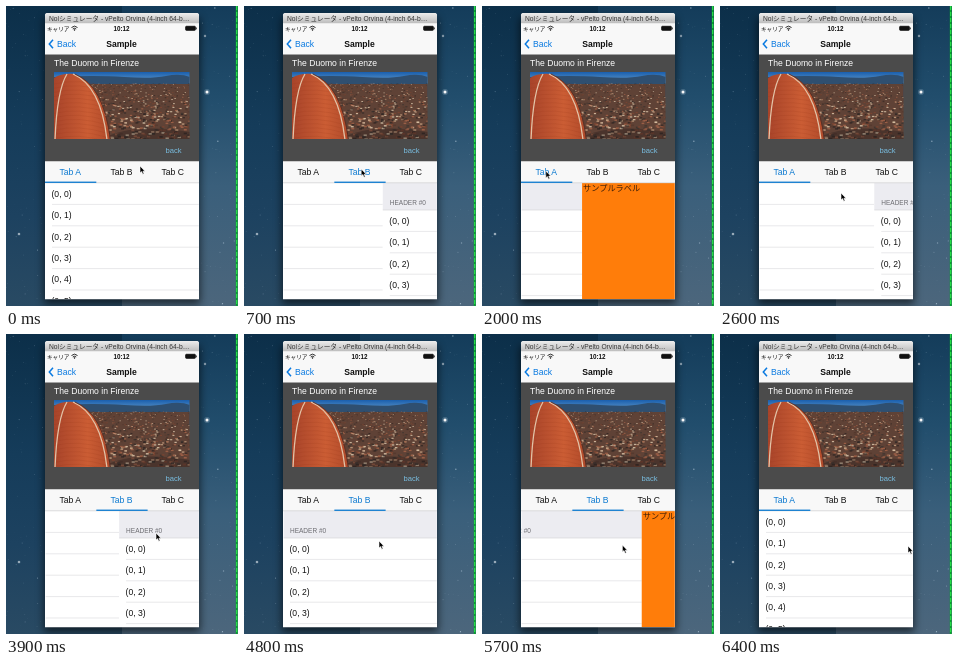
These frames come from a looping animation (232x300 px, 6500 ms). An HTML page:

```html
<!DOCTYPE html>
<html lang="ja">
<head>
<meta charset="utf-8">
<title>Tab pager</title>
<style>
html, body { margin: 0; width: 100%; height: 100%; overflow: hidden; background: #10283f; }
svg { display: block; width: 100%; height: 100%; }
text { font-family: "Liberation Sans", "Noto Sans CJK JP", "Noto Sans CJK", sans-serif; font-size: 8.6px; fill: #111; }
.mid { text-anchor: middle; }
.bold { font-weight: bold; }
</style>
</head>
<body>
<svg id="stage" viewBox="0 0 232 300" xmlns="http://www.w3.org/2000/svg">
  <defs>
    <linearGradient id="west" x1="0" y1="0" x2="0" y2="1">
      <stop offset="0" stop-color="#0c2f49"/>
      <stop offset=".4" stop-color="#153c5a"/>
      <stop offset=".7" stop-color="#1d4260"/>
      <stop offset="1" stop-color="#294a63"/>
    </linearGradient>
    <linearGradient id="east" x1="0" y1="0" x2="0" y2="1">
      <stop offset="0" stop-color="#143c5a"/>
      <stop offset=".3" stop-color="#214d6c"/>
      <stop offset=".6" stop-color="#3a5f7b"/>
      <stop offset="1" stop-color="#4c667c"/>
    </linearGradient>
    <linearGradient id="bar" x1="0" y1="0" x2="0" y2="1">
      <stop offset="0" stop-color="#ededed"/>
      <stop offset="1" stop-color="#bcbcbc"/>
    </linearGradient>
    <linearGradient id="air" x1="0" y1="0" x2="0" y2="1">
      <stop offset="0" stop-color="#1a5fae"/>
      <stop offset="1" stop-color="#6ea3cf"/>
    </linearGradient>
    <linearGradient id="tiles" x1="0" y1="0" x2="1" y2="0">
      <stop offset="0" stop-color="#a8442a"/>
      <stop offset=".6" stop-color="#cb5d34"/>
      <stop offset="1" stop-color="#b04a2a"/>
    </linearGradient>
    <filter id="soft" x="-20%" y="-10%" width="140%" height="120%"><feGaussianBlur stdDeviation="4"/></filter>
    <clipPath id="screen"><rect x="39.600" y="177" width="153.200" height="116"/></clipPath>
    <clipPath id="frame"><rect x="48" y="66" width="135.500" height="67"/></clipPath>
  </defs>

  <rect width="116" height="300" fill="url(#west)"/>
  <rect x="116" width="116" height="300" fill="url(#east)"/>
  <g id="stars" fill="#c5d9e8"></g>
  <path d="M230.700 0V300" stroke="#06a52c" stroke-width="1.800"/>
  <path d="M230.700 0V300" stroke="#2ce04c" stroke-width="1.200" stroke-dasharray="4 2"/>

  <rect x="38" y="12" width="156" height="286" fill="#000" opacity=".6" filter="url(#soft)"/>
  <path d="M39 293.300V9.500Q39 7 41.500 7H190.500Q193 7 193 9.500V293.300Z" fill="#fff"/>
  <path d="M39 17.500V9.500Q39 7 41.500 7H190.500Q193 7 193 9.500V17.500Z" fill="url(#bar)"/>
  <text x="43" y="14.900" style="font-size:6.700px;fill:#333">Nolシミュレータ - vPelto Orvina (4-inch 64-b…</text>

  <rect x="39" y="17.500" width="154" height="31" fill="#f8f8f8"/>
  <text x="41" y="24.500" style="font-size:5.600px">キャリア</text>
  <g fill="none" stroke="#111" stroke-width=".9">
    <path d="M65.500 21.500Q68.500 18.800 71.500 21.500M66.800 23Q68.500 21.500 70.200 23"/>
    <rect x="179.700" y="20.300" width="9.600" height="4" rx=".6" fill="#111"/>
    <path d="M190.300 21.500V23.300"/>
  </g>
  <circle cx="68.500" cy="24" r=".7"/>
  <text class="mid bold" x="115.500" y="24.700" style="font-size:6.300px">10:12</text>
  <path d="M47 33.800L43.300 38L47 42.200" fill="none" stroke="#0879e0" stroke-width="1.500"/>
  <text x="51" y="41" style="fill:#0879e0">Back</text>
  <text class="mid bold" x="115.500" y="41">Sample</text>

  <rect x="39" y="48.500" width="154" height="107" fill="#4b4b4b"/>
  <text x="48" y="60.300" style="fill:#fff">The Duomo in Firenze</text>
  <g id="photo" clip-path="url(#frame)"></g>
  <text x="159.500" y="147.300" style="font-size:7.600px;fill:#79bde0">back</text>

  <g id="pages" clip-path="url(#screen)"></g>

  <rect x="39" y="155.500" width="154" height="21.500" fill="#f8f8f8"/>
  <path d="M39 176.800H193" stroke="#c4c4c8" stroke-width=".6"/>
  <g id="tabs"></g>
  <rect id="line" y="175.600" width="51.300" height="1.300" fill="#0b79d0"/>
  <path id="cursor" d="M0 0V7L1.600 5.600L2.800 8.300L4 7.700L2.900 5.200H5Z" fill="#000" stroke="#fff" stroke-width=".6"/>
</svg>
<script>
const LOOP = 6500, STEP = 100, PAGE = 154, LEFT = 39, TOP = 177, ROW = 21.4;
const $ = id => document.getElementById(id);

function add(parent, tag, attrs, text) {
  const el = document.createElementNS("http://www.w3.org/2000/svg", tag);
  for (const key in attrs) el.setAttribute(key, attrs[key]);
  if (text) el.textContent = text;
  parent.appendChild(el);
  return el;
}

function randomizer(seed) {
  return () => (seed = (seed * 16807) % 2147483647) / 2147483647;
}

function drawStars() {
  const rnd = randomizer(4127), g = $("stars");
  for (let i = 0; i < 130; i++) {
    const x = i % 2 ? rnd() * 38 : 194 + rnd() * 35;
    add(g, "circle", { cx: x, cy: rnd() * 300, r: 0.2 + rnd() ** 4 * 0.6, opacity: 0.2 + rnd() * 0.5 });
  }
  for (const [x, y, r] of [[13, 228, 0.8], [199, 30, 0.7], [201, 86, 1.5]]) {
    add(g, "circle", { cx: x, cy: y, r: r * 2, opacity: 0.25 });
    add(g, "circle", { cx: x, cy: y, r, fill: "#fff" });
  }
}

function drawPhoto() {
  const g = $("photo"), rnd = randomizer(913);
  const tones = ["#c9a382", "#7d4531", "#a8664a", "#2f2624", "#e0ccb0", "#3c3530", "#54392e"];
  add(g, "rect", { x: 48, y: 66, width: 136, height: 12, fill: "url(#air)" });
  add(g, "path", { d: "M48 71Q90 69 118 71T160 70T184 71V92H48Z", fill: "#2f4f70" });
  add(g, "rect", { x: 48, y: 78, width: 136, height: 56, fill: "#5f4236" });
  for (let i = 0; i < 800; i++) {
    const depth = rnd() ** 1.2, size = 0.6 + depth * 1.7;
    add(g, "rect", {
      x: 68 + rnd() * 116, y: 77 + depth * 56, width: size * 1.5, height: size * 0.8,
      fill: tones[Math.floor(rnd() * tones.length)], opacity: 0.8
    });
  }
  add(g, "path", { d: "M95 134Q122 116 184 126V134Z", fill: "#241c1b", opacity: 0.35 });
  add(g, "path", { d: "M48 72Q56 67 68 68Q97 78 104 134H48Z", fill: "url(#tiles)" });
  for (let i = 0; i < 14; i++) {
    const y = 75 + i * 4.2;
    add(g, "path", { d: `M48 ${y + 3}Q72 ${y - 3} 101 ${y + 6}`, fill: "none", stroke: "#8f321c", "stroke-width": 0.4, opacity: 0.35 });
  }
  for (const d of ["M67 68Q95 80 101 134", "M61 68Q51 84 49 134"]) {
    add(g, "path", { d, fill: "none", stroke: "#e2c2a6", "stroke-width": 1.3 });
  }
  add(g, "path", { d: "M69 68Q98 80 104.5 134", fill: "none", stroke: "#5d2b20", "stroke-width": 0.8 });
}

function drawList(g, top) {
  for (let i = 0; top + i * ROW < 296; i++) {
    const y = top + i * ROW;
    add(g, "text", { x: 6.5, y: y + 13.7 }, `(0, ${i})`);
    add(g, "path", { d: `M7 ${y + ROW}H${PAGE}`, stroke: "#d9d9dc", "stroke-width": 0.6 });
  }
}

function drawPages() {
  const [a, b, c] = [0, 1, 2].map(i => {
    const g = add($("pages"), "g", {});
    add(g, "rect", { x: 0, y: TOP, width: PAGE, height: 117, fill: i === 2 ? "#ff7d0a" : "#fff" });
    return g;
  });
  drawList(a, TOP);
  add(b, "rect", { x: 0, y: TOP, width: PAGE, height: 27, fill: "#ececf1" });
  add(b, "path", { d: `M0 204H${PAGE}`, stroke: "#d0d0d5", "stroke-width": 0.6 });
  add(b, "text", { x: 7, y: 199.2, style: "font-size:6.500px;fill:#6d6d72" }, "HEADER #0");
  drawList(b, 204);
  add(c, "text", { x: 1, y: 185, style: "font-size:8.200px;fill:#40200a" }, "サンプルラベル");
  return [a, b, c];
}

drawStars();
drawPhoto();
const pages = drawPages();
const tabs = ["A", "B", "C"].map((name, i) =>
  add($("tabs"), "text", { class: "mid", x: 64.3 + i * 51.2, y: 169.3 }, "Tab " + name));

// Page changes: start time, page, duration, tapped
const moves = [
  [560, 1, 350, true], [1205, 2, 350, true], [1900, 0, 350, true],
  [2469, 1, 400], [2885, 2, 400], [3300, 1, 400], [3705, 0, 400],
  [4300, 1, 400], [4880, 2, 400], [5420, 1, 400], [5900, 0, 400]
];

// Pointer path: time, x, y
const path = [
  [0, 134, 160], [200, 132, 161], [500, 115, 163], [800, 118, 163], [1100, 157, 163],
  [1400, 157, 163], [1800, 62, 164], [2050, 64, 165], [2440, 161, 187], [2600, 121, 187],
  [2700, 88, 190], [2885, 155, 195], [3050, 80, 198], [3280, 76, 198], [3440, 150, 199],
  [3690, 80, 199], [3900, 150, 199], [3980, 172, 203], [4290, 150, 207], [4450, 80, 208],
  [4700, 130, 207], [4800, 135, 207], [4890, 140, 207], [5050, 82, 208], [5300, 83, 208],
  [5420, 85, 209], [5580, 165, 211], [5880, 95, 211], [6060, 185, 212], [6300, 188, 212]
];

const smooth = u => u * u * (3 - 2 * u);
const clamp = u => Math.min(1, Math.max(0, u));

function pager(t) {
  let pos = 0, tab = 0;
  for (const [start, page, length, tapped] of moves) {
    if (t < start) break;
    pos += (page - pos) * smooth(clamp((t - start) / length));
    tab = tapped ? page : Math.round(pos);
  }
  return { pos, tab };
}

function pointer(t) {
  const next = path.findIndex(p => p[0] > t);
  if (next < 0) return path[path.length - 1].slice(1);
  const [t0, x0, y0] = path[next - 1], [t1, x1, y1] = path[next];
  const u = smooth((t - t0) / (t1 - t0));
  return [x0 + (x1 - x0) * u, y0 + (y1 - y0) * u];
}

function render(t) {
  const { pos, tab } = pager(t);
  pages.forEach((g, i) => g.setAttribute("transform", `translate(${LEFT + (i - pos) * PAGE})`));
  tabs.forEach((el, i) => { el.style.fill = i === tab ? "#0b79d0" : "#111"; });
  $("line").setAttribute("x", LEFT + tab * PAGE / 3);
  $("cursor").setAttribute("transform", `translate(${pointer(t)})`);
}

const begin = performance.now();
function tick() {
  const t = (performance.now() - begin) % LOOP;
  render(Math.floor(t / STEP) * STEP);
  requestAnimationFrame(tick);
}
tick();
</script>
</body>
</html>
```
